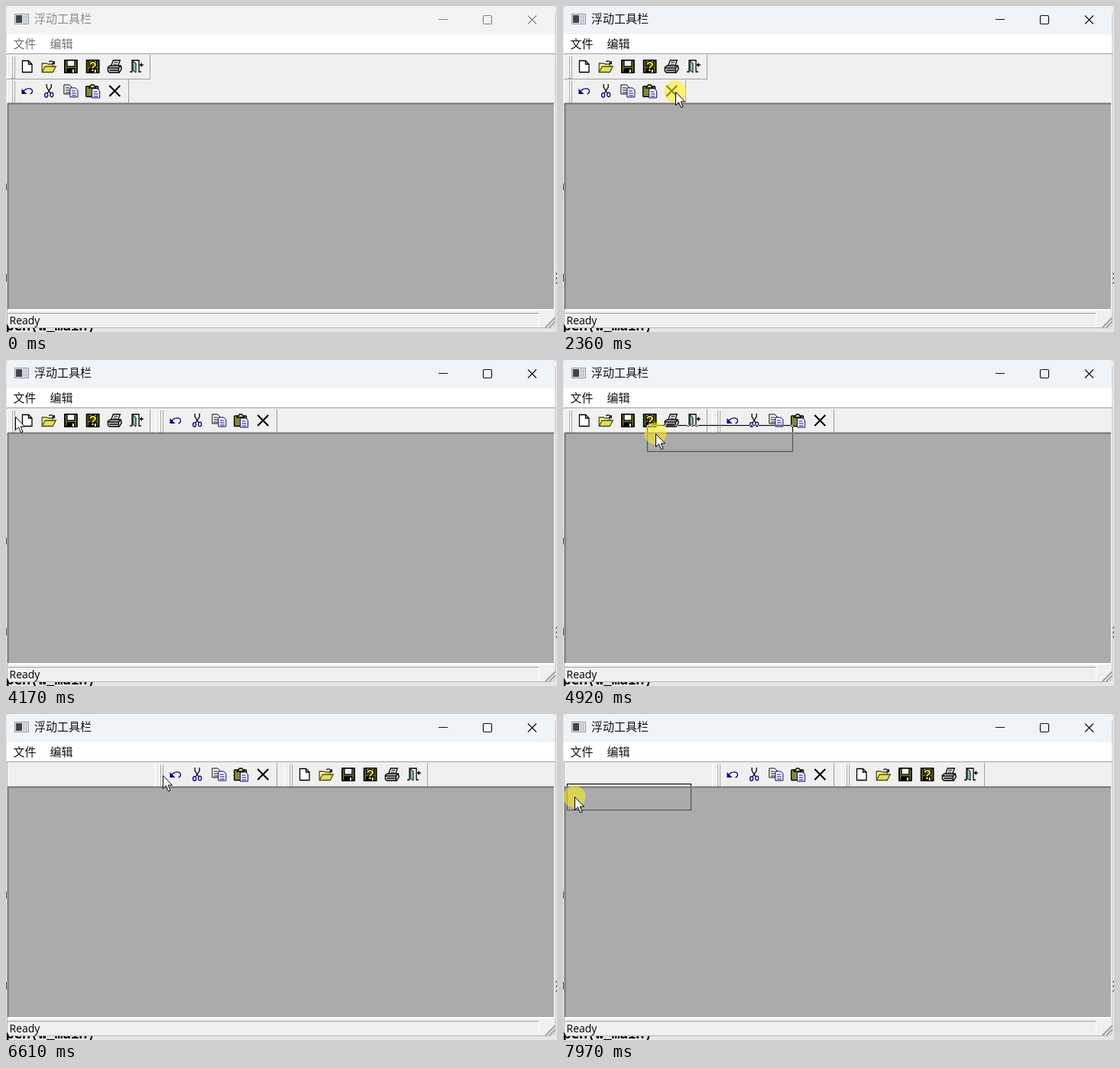
Recreate the animation shown at these times as an HTML page. Size 721 by 426 pixels, loop 8 s.

```html
<!DOCTYPE html>
<html lang="zh-CN">
<head>
<meta charset="utf-8">
<title>浮动工具栏</title>
<style>
html, body { margin: 0; width: 100%; height: 100%; overflow: hidden; background: #e6e6e6; }
svg { display: block; width: 721px; height: 426px; isolation: isolate; }
text { font-family: "Noto Sans CJK SC", "Noto Sans CJK", "Noto Sans", sans-serif; font-size: 15px; }
.code { font: 600 17.7px "Noto Sans Mono", "Liberation Mono", monospace; }
#status { font: 14px "Open Sans", "Noto Sans", sans-serif; }
#title { fill: #f3f3f3; }
#caption { fill: #8c8c8c; }
#menu { fill: #6d7072; font-weight: 500; }
#menu text { font-weight: 500; }
#buttons { fill: none; stroke: #858585; stroke-width: 1.2; }
.active #title { fill: #eff4f9; }
.active #caption, .active #menu { fill: #111; }
.active #buttons { stroke: #111; }
.dark { fill: none; stroke: #a0a0a0; }
.light { fill: none; stroke: #fff; }
.icon { fill: none; stroke: #000; stroke-width: 1.3; }
.icon .ask { font: bold 17px "Liberation Sans", sans-serif; fill: #ffe93a; stroke-width: 2.5; paint-order: stroke; text-anchor: middle; }
.navy { stroke: #000080; }
.thin { stroke-width: 1; }
#ghost { fill: none; stroke: #fff; stroke-width: 1.2; mix-blend-mode: difference; }
#press { fill: #fff014; opacity: .55; }
</style>
</head>
<body>
<svg id="stage" viewBox="0 0 721 426">
  <defs>
    <clipPath id="frame"><rect x="1" y="-1" width="718.5" height="422" rx="8"/></clipPath>
    <g id="disk">
      <rect x="-8" y="-8" width="16" height="16" fill="#75752a" stroke-width="1.8"/>
      <rect x="-5" y="-8" width="10" height="8" fill="#f2f2f2"/>
      <path d="M-5 3H5V8H-5Z" fill="#000"/>
      <path d="M3 4V8" stroke="#fff" stroke-width="2"/>
    </g>
    <path id="sheet" d="M-5 -6H2L5 -3V6H-5ZM-3 -2H2M-3 1H3M-3 4H3" fill="#fff"/>
  </defs>

  <text class="code" x="0" y="424">pen(w_main)</text>
  <path d="M0 232V241M0 350V360" stroke="#555" stroke-width="2"/>
  <path d="M719 351l2 -2m-2 8l2 -2m-2 8l2 -2" stroke="#222" stroke-width="1.4"/>

  <g clip-path="url(#frame)">
    <rect width="721" height="422" fill="#f0f0f0"/>
    <rect id="title" width="721" height="37"/>
    <rect y="37" width="721" height="25" fill="#fff"/>
    <path class="dark" d="M0 62.5H720"/>
    <rect x="11.5" y="10.5" width="18" height="13" fill="#e4e4e4" stroke="#999"/>
    <rect x="13" y="12" width="8" height="10" fill="#3d4650"/>
    <path d="M23.5 12V22M26.5 12V22" stroke="#a9bccd" stroke-width="1.5"/>
    <text id="caption" x="37" y="22">浮动工具栏</text>
    <g id="buttons">
      <path d="M566 17.5H578M683 12.5l11 11m0 -11l-11 11"/>
      <rect x="624.5" y="12.5" width="11" height="11" rx="1.5"/>
    </g>
    <g id="menu"><text x="9.5" y="55">文件</text><text x="57.5" y="55">编辑</text></g>

    <path id="rowLine" class="dark" d="M1 95.5H189"/>
    <rect id="area" x="3" width="714" fill="#ababab"/>
    <path id="edge" fill="none" stroke="#757575" stroke-width="2"/>
    <path id="shine" class="light" stroke-width="2"/>

    <path class="dark" d="M1 401.5H697"/>
    <path class="light" d="M697.5 402V420.5H2"/>
    <path class="dark" stroke-width="2" d="M706 420l13 -13m-8 13l8 -8m-3 8l3 -3"/>
    <text id="status" x="4.5" y="416">Ready</text>
    <path d="M1.5 62V422M1 420.5H720M719 8V420" stroke="#b4b4b4"/>
  </g>

  <g id="fileBar"></g>
  <g id="editBar"></g>
  <rect id="ghost" height="34"/>
  <circle id="press" r="14.5"/>
  <path id="cursor" d="M0 0V17L4 13.3L7 20.3L9.6 19.2L6.7 12.5H12Z" fill="#fff" stroke="#000"/>
</svg>

<script>
const $ = id => document.getElementById(id);

// Icons are drawn around their own centre
const icons = {
  page: `<path d="M-6 -7.5H2L6.500 -3V7.500H-6ZM2 -7.500V-3H6.500" fill="#fff"/>`,
  open: `<path d="M-9 7V-4H-3L-1 -3H5V0" fill="#ffff9c" stroke="#4c4c16"/>
    <path d="M-9 7.500L-5 0H9L5 7.500Z" fill="#e6dc62" stroke="#4c4c16"/>
    <path d="M0 -6Q4 -9 7 -4V-7M7 -4H4"/>`,
  save: `<use href="#disk"/>`,
  saveAs: `<use href="#disk"/><text class="ask" y="6">?</text>`,
  print: `<path d="M-5 0L-2 -8H7L4 0Z" fill="#fff"/><path class="thin" d="M-1 -5.500H4M-2 -3H3"/>
    <path d="M-9 1L-6 -1H8L9 3L6 8H-7L-9 6ZM-9 2H5V8M5 2L8 -1M-7 5H4" fill="#d0d0d0"/>`,
  exit: `<path d="M-9 7H-6V-8H3V7H6"/><path class="thin" d="M-5 -7L-1 -4V8L-5 5Z" fill="#8cc4c4"/>
    <path d="M4 -2H9"/><path d="M4 -2L7 -5V1Z" fill="#000" stroke="none"/>`,
  undo: `<path d="M-7 -3V4H0Z" fill="#000080" stroke="none"/><path class="navy" d="M-5 1C-2 -4 7 -5 7 .5Q7 3 4 4"/>`,
  cut: `<path d="M-3 -9V-5L2 3M3 -9V-5L-2 3"/>
    <g class="navy"><ellipse cx="-3.500" cy="5.500" rx="2" ry="2.800"/><ellipse cx="3.500" cy="5" rx="2" ry="2.800"/></g>`,
  copy: `<use class="thin" href="#sheet" x="-4" y="-2"/><use class="navy thin" href="#sheet" x="4" y="2"/>`,
  paste: `<rect x="-9" y="-6" width="16" height="13.500" rx="1" fill="#85853c"/>
    <path d="M-5 -4L-2 -8H1L4 -4Z" fill="#e8e070"/><use class="navy thin" href="#sheet" x="4" y="3"/>`,
  remove: `<path d="M-7 -7L7 7M7 -7L-7 7" stroke-width="2"/>`
};

function makeBar(id, names, width, extra = '') {
  const body = names.map((name, i) =>
    `<g class="icon" transform="translate(${27.5 + 28.7 * i} 79)">${icons[name]}</g>`).join('');
  $(id).innerHTML = `<path class="light" d="M1.5 64V95M7.5 66V94M10 66V94"/>
    <path class="dark" d="M8.5 66V94M11.5 66V94.500H7M${width + .5} 64V95"/>${extra}${body}`;
  return { id, width };
}

const fileBar = makeBar('fileBar', ['page', 'open', 'save', 'saveAs', 'print', 'exit'], 188);
const editBar = makeBar('editBar', ['undo', 'cut', 'copy', 'paste', 'remove'], 160,
  `<g id="hot"><rect x="13" y="66" width="29" height="28" fill="#f5f5fa"/>
   <path class="light" d="M13.500 93V66.500H41"/><path class="dark" d="M41.500 66V93.500H13"/></g>`);

const LOOP = 8000, STEP = 68, FOCUS = 1740;
const DOCK_EDIT = 3600, DOCK_FILE = 5900;

// Pointer moves: begin, end, x, y; it rests in the gaps
const moves = [
  [0, 250, 312, -40],
  [250, 480, 318, 374],
  [480, 1000, 18, 108],
  [1070, 1270, 8, 108],
  [FOCUS, 2360, 147, 112],
  [2360, 3370, 200, 77],
  [DOCK_EDIT, 4170, 12, 74],
  [4240, 4920, 121, 96],
  [4920, 5740, 374, 74],
  [DOCK_FILE, 6610, 205, 80],
  [6750, 7360, 22, 85],
  [7500, 7970, 15, 108]
];

const drags = [
  { bar: editBar, from: FOCUS, to: DOCK_EDIT, outline: 2700 },
  { bar: fileBar, from: 4240, to: DOCK_FILE, outline: 4240 },
  { bar: editBar, from: 6750, to: LOOP, outline: 6750 }
];

// Speeds up after a rest and slows down before one
function ease(k, fromRest, toRest) {
  if (fromRest && toRest) return k * k * (3 - 2 * k);
  if (fromRest) return k * k;
  return toRest ? 1 - (1 - k) ** 2 : k;
}

function pointer(t) {
  const i = moves.findLastIndex(m => m[0] <= t);
  const [begin, end, x, y] = moves[i];
  const [, lastEnd, x0, y0] = moves[i - 1] || moves[i];
  const next = moves[i + 1];
  const n = Math.round((end - begin) / STEP);
  const k = Math.min(1, Math.floor((t - begin) / (end - begin) * n) / n);
  const e = ease(k, begin > lastEnd, !next || next[0] > end);
  return [x0 + (x - x0) * e, y0 + (y - y0) * e];
}

// Where a bar is docked
function dock(bar, t) {
  if (bar === fileBar) return t < DOCK_FILE ? [0, 0] : [363, 0];
  return t < DOCK_EDIT ? [0, 32] : [194, 0];
}

const move = (id, x, y) => $(id).setAttribute('transform', `translate(${x} ${y})`);
const show = (id, on) => $(id).style.display = on ? '' : 'none';

function drawDrag(t, x, y) {
  const drag = drags.find(d => t >= d.from && t < d.to);
  show('press', drag);
  show('ghost', drag && t >= drag.outline);
  if (!drag) return;
  const [px, py] = pointer(drag.from);
  const [bx, by] = dock(drag.bar, drag.from);
  move('press', x, y);
  move('ghost', Math.round(x - px + bx) + 1.5, Math.round(y - py + by) + 63.5);
  $('ghost').setAttribute('width', drag.bar.width + 2);
}

function draw(t) {
  const [x, y] = pointer(t);
  const twoRows = t < DOCK_EDIT;
  const top = twoRows ? 128 : 96;

  $('stage').classList.toggle('active', t >= FOCUS);
  for (const bar of [fileBar, editBar]) move(bar.id, ...dock(bar, t));
  show('hot', t >= 1000 && t < 1200);
  show('rowLine', twoRows);
  $('area').setAttribute('y', top);
  $('area').setAttribute('height', 396 - top);
  $('edge').setAttribute('d', `M2.5 396V${top - .5}H717`);
  $('shine').setAttribute('d', `M718 ${top}V397H2`);

  move('cursor', Math.round(x) + .5, Math.round(y) + .5);
  drawDrag(t, x, y);
}

const start = performance.now();
function tick() {
  draw((performance.now() - start) % LOOP);
  requestAnimationFrame(tick);
}
tick();
</script>
</body>
</html>
```
